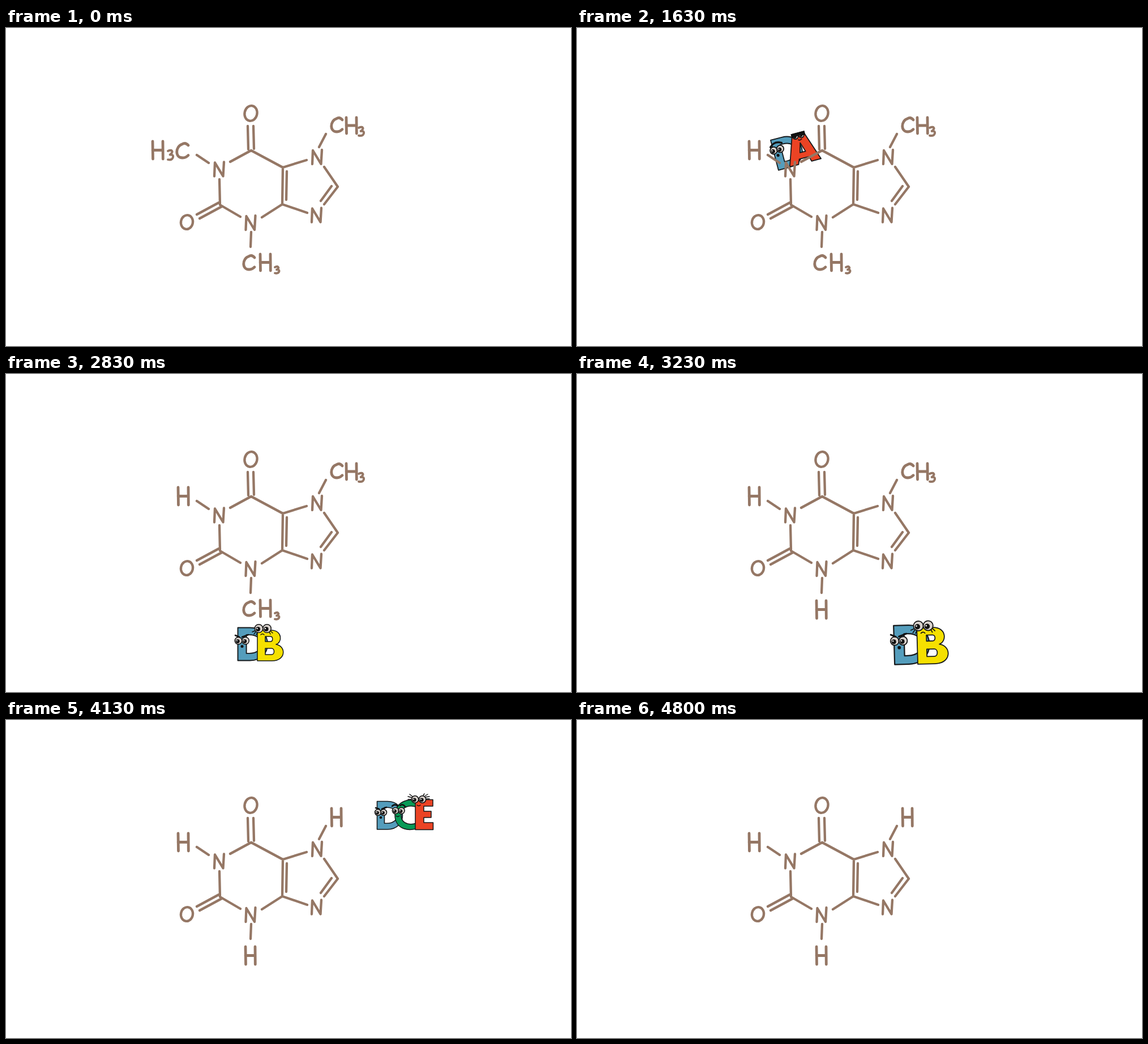
Animation of 998 by 561 pixels, one loop 5010 ms. Source, as an HTML page:

```html
<!DOCTYPE html>
<html lang="en">
<head>
<meta charset="utf-8">
<title>Demethylation steps</title>
<style>
  html, body { margin: 0; width: 100%; height: 100%; overflow: hidden; background: #fff; }
  svg { display: block; width: 998px; height: 561px; }
  .ink { fill: none; stroke: #957765; stroke-width: 4.8; stroke-linecap: round; stroke-linejoin: round; }
  .bond { stroke-width: 4.3; }
  .small { stroke-width: 3.9; }
  .letter { stroke: #15181a; stroke-width: 1.5; stroke-linejoin: round; fill-rule: evenodd; }
  .line { fill: none; stroke: #111; stroke-width: 1.4; stroke-linecap: round; }
  .brow { stroke-width: 2.6; }
</style>
</head>
<body>
<svg id="stage" viewBox="0 0 998 561"></svg>
<script>
const LOOP = 5010, FRAME = 1000 / 30, TRAVEL = 499, EXIT = 400;
const BLUE = '#549dbc', RED = '#eb4324', GREEN = '#079a57', YELLOW = '#f5e000';

// Handwritten glyphs
const stroke = (d, cls = '') => `<path class="ink ${cls}" d="${d}"/>`;
const glyphH = (x, y, w = 18, h = 31) =>
  stroke(`M${x} ${y}l.5 ${h}M${x + w} ${y}l.3 ${h}M${x} ${y + h / 2}h${w}`);
const glyphN = (x, y) => stroke(`M${x} ${y + 25}l1 -24l14.5 24l1.5 -25`, 'bond');
const glyphO = (x, y, rx, ry) =>
  `<ellipse class="ink bond" rx="${rx}" ry="${ry}" transform="translate(${x} ${y}) rotate(12)"/>`;
const glyphC = (x, y, w = 19, h = 24) => stroke(
  `M${x + w} ${y + 3}Q${x + w * .75} ${y - 3} ${x + w * .45} ${y + 1}` +
  `C${x - w * .15} ${y + h * .2} ${x - w * .2} ${y + h} ${x + w * .5} ${y + h}` +
  `Q${x + w * .8} ${y + h} ${x + w} ${y + h * .82}`);
const glyph3 = (x, y, w = 9, h = 17) => stroke(
  `M${x} ${y + 1}Q${x + w * .7} ${y - 2} ${x + w * .85} ${y + 2}Q${x + w * .8} ${y + h * .3} ${x + w * .4} ${y + h * .45}` +
  `Q${x + w * 1.1} ${y + h * .4} ${x + w} ${y + h * .7}Q${x + w * .8} ${y + h * 1.05} ${x} ${y + h * .95}`, 'small');

const bonds = stroke(
  'M427 173L428 214M437 173L438 213M396 236L433 216L489 246L488 311L452 334' +
  'M496 253L495 303M489 246L531 233M553 210L565 187M562 245L586 280L562 311' +
  'M575 279L556 305M488 311L532 326M433 360L432 386M414 333L378 312L377 267' +
  'M376 308L337 329M381 315L342 336M358 238L337 224', 'bond');

const molecule = bonds + glyphO(432.5, 150.5, 11, 13.5) + glyphO(319.5, 342.5, 10.5, 12.5) +
  glyphN(368, 236.5) + glyphN(541, 215) + glyphN(540, 317.5) + glyphN(423.500, 331);

// Each methyl group turns into a single H
const swaps = [
  { at: 930, from: glyphH(259, 200) + glyph3(286, 216) + glyphC(302, 204, 20, 25), to: glyphH(304, 200) },
  { at: 3015, from: glyphC(420, 402) + glyphH(449, 399, 18, 29) + glyph3(475, 421, 7.5, 12), to: glyphH(423, 400, 17) },
  { at: 4000, from: glyphC(575, 159) + glyphH(601, 158, 18, 28) + glyph3(623, 175, 9, 15.5), to: glyphH(575, 156, 17) }
];

// Cartoon letters
const letter = (d, fill) => `<path class="letter" fill="${fill}" d="${d}"/>`;
const line = (d, cls = '') => `<path class="line ${cls}" d="${d}"/>`;
const dot = (x, y, r) => `<circle cx="${x}" cy="${y}" r="${r}" fill="#111"/>`;
const eye = (x, y, r) =>
  `<circle cx="${x}" cy="${y}" r="${r}" fill="#d9d2cd" stroke="#111" stroke-width="1.5"/>` +
  dot(x - r * .2, y + r * .15, r * .55) +
  `<circle cx="${x - r * .4}" cy="${y}" r="${r * .16}" fill="#fff"/>`;
const eyes = (x, y, gap, r) => eye(x, y, r) + eye(x + gap, y, r);

const letterD = (x, y, h) => {
  const k = h / 46;
  return `<g transform="translate(${x} ${y}) scale(${k})">` +
    letter('M0 0H17C50 0 50 46 17 46H0ZM12 10V36H16C39 36 39 10 16 10Z', BLUE) + '</g>';
};

const spriteDA = letterD(180, 192, 46) +
  eyes(180.5, 208, 10, 5.3) + line('M177 202Q185 194 195 200', 'brow') + dot(185, 216.5, 2.2) +
  letter('M213 192H230L245.5 237.5H231L229 230H214L211 237.5H197.5ZM221.5 207L217.5 221H226Z', RED) +
  eyes(217, 196, 9, 4) +
  '<path d="M211 191H232V197Q227 198 222 195.500Q216 198 211 197Z" fill="#111"/>' +
  line('M220 202Q222 204 225 202');

const spriteDB = letterD(409.5, 447.5, 58) +
  eyes(410.5, 470.5, 12.5, 6.3) + line('M405 461L412 464M417 464L428 460', 'brow') + dot(417, 480.5, 2.5) +
  letter('M444 452H468C489 452 488 474 477 477C495 480 495 506 470 506H444Z' +
    'M458 463V472H467C472 472 472 463 467 463ZM458 484V495H469C475 495 475 484 469 484Z', YELLOW) +
  eyes(446.5, 449, 14.5, 7.3) +
  line('M440 453L435 455M441 455L438 459M444 456L442 460M465 455L467 459M467 453L471 457M450 460Q453 457 456 460');

const spriteDCE = letterD(655.5, 143.5, 49.5) +
  eyes(657, 163, 10, 5.5) + line('M653 155L659 157M664 157L672 154', 'brow') + dot(662, 172, 2.3) +
  letter('M735 147C715 134 687 143 687 168C687 193 714 200 735 187V177C716 189 698 184 698 168C698 151 716 147 735 158Z', GREEN) +
  eyes(688, 160, 10.5, 5.6) + line('M682 152Q687 147 692 152M696 151Q701 147 705 153', 'brow') +
  line('M689 169Q692 172 695 169') +
  letter('M723 140.500H754V152H738V161H751V172H738V181H754.500V193.500H723Z', RED) +
  eyes(722.5, 140, 13, 6.2) +
  line('M717 137L710 135M718 135L713 131M741 136L748 135M740 134L745 131M737 133L739 130M716 140L710 140M742 139L748 139') +
  line('M726 150Q729 153 732 150');

const sprites = [
  { art: spriteDA, x: 211, y: 215, enter: 440, enterTime: 400, exit: 1352, tiltIn: 44, tiltOut: 25 },
  { art: spriteDB, x: 447, y: 474, enter: 1990, enterTime: 680, exit: 2961, tiltIn: 10, tiltOut: 3 },
  { art: spriteDCE, x: 703, y: 165, enter: 3561, enterTime: 400, exit: 4425, tiltIn: 46, tiltOut: 25 }
];

const stage = document.getElementById('stage');
stage.innerHTML =
  sprites.map(s => `<g class="sprite">${s.art}</g>`).join('') + molecule +
  swaps.map(s => `<g class="from">${s.from}</g><g class="to">${s.to}</g>`).join('');
const bind = (list, key, selector) =>
  stage.querySelectorAll(selector).forEach((el, i) => { list[i][key] = el; });
bind(sprites, 'el', '.sprite');
bind(swaps, 'fromEl', '.from');
bind(swaps, 'toEl', '.to');

const clamp = v => Math.min(1, Math.max(0, v));

function pose(s, t) {
  const shown = t >= s.enter && t < s.exit + EXIT;
  s.el.style.display = shown ? '' : 'none';
  if (!shown) return;
  const left = 1 - clamp((t - s.enter) / s.enterTime);
  const gone = clamp((t - s.exit) / EXIT);
  const x = s.x + TRAVEL * (gone ** 3 - left ** 3);
  const angle = -s.tiltIn * left ** 1.5 - s.tiltOut * gone ** 1.5;
  const scale = 1 + .33 * left + .27 * gone;
  s.el.setAttribute('transform',
    `translate(${x} ${s.y}) rotate(${angle}) scale(${scale}) translate(${-s.x} ${-s.y})`);
}

function draw(now) {
  // The motion advances at 30 steps per second
  const t = Math.floor((now % LOOP + 4) / FRAME) * FRAME;
  sprites.forEach(s => pose(s, t));
  swaps.forEach(s => {
    const k = clamp((t - s.at) / 60);
    s.fromEl.style.opacity = 1 - k;
    s.toEl.style.opacity = k;
  });
}

function tick() {
  draw(performance.now());
  requestAnimationFrame(tick);
}
tick();
</script>
</body>
</html>
```
